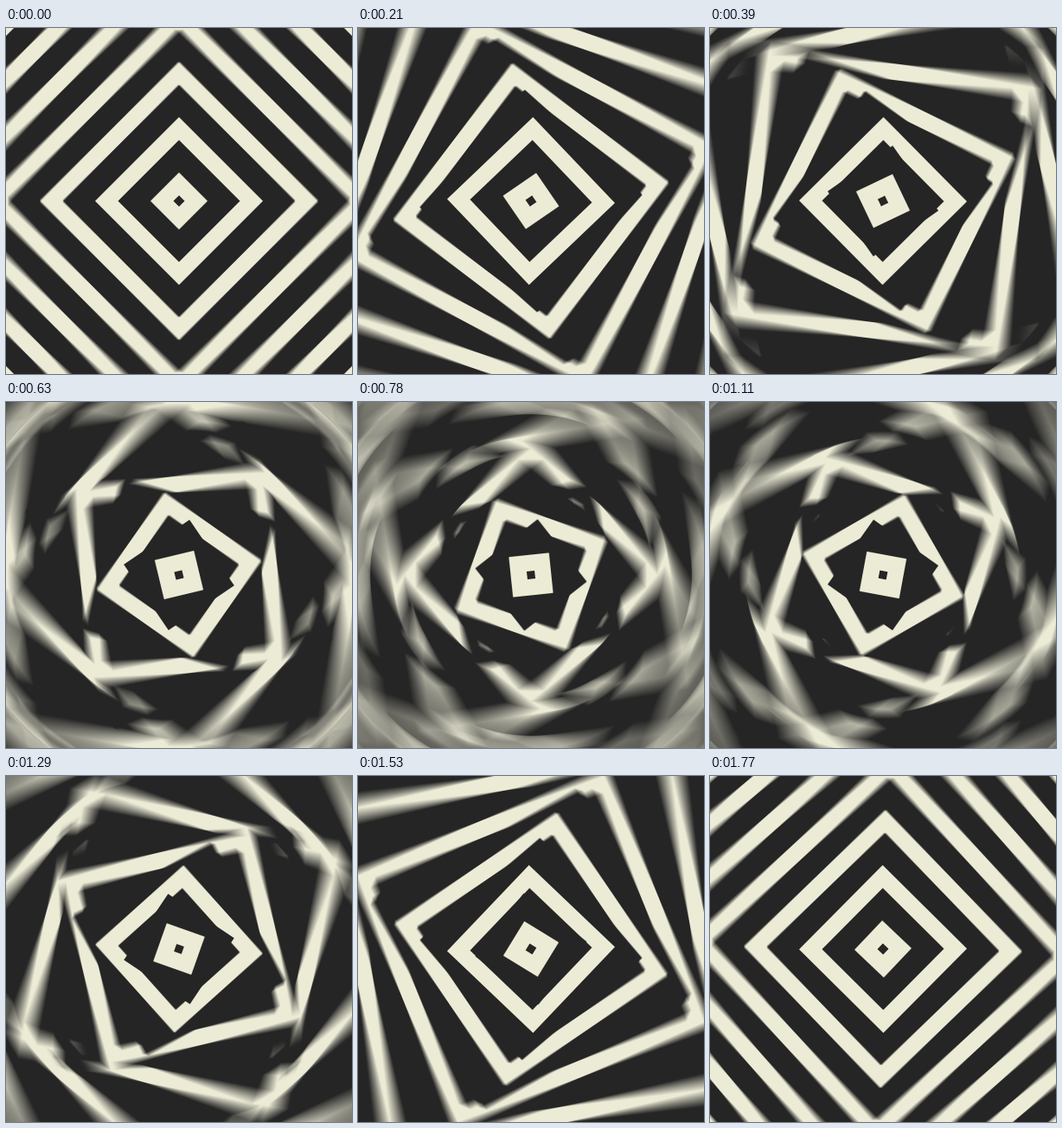
Recreate the animation shown at these times as an HTML page with a canvas. Size 400x400 px, loop 1800 ms.

```html
<!DOCTYPE html>
<html lang="en">
<head>
<meta charset="utf-8">
<title>Twisting squares</title>
<style>
html, body { margin: 0; width: 100%; height: 100%; overflow: hidden; background: #252525; }
canvas { display: block; width: 400px; height: 400px; }
</style>
</head>
<body>
<canvas id="stage" width="400" height="400"></canvas>
<script>
const HALF = 200, LOOP = 1800, FRAMES = 60;
const SAMPLES = 48, SHUTTER = 1.4;
const LAYERS = 14, STEP = 32, OUTER = 33, INNER = 6.5;
const DARK = [37, 37, 37], CREAM = [236, 235, 214];

const view = document.getElementById('stage').getContext('2d');
view.imageSmoothingEnabled = false;

function quarterCanvas() {
  const canvas = document.createElement('canvas');
  canvas.width = canvas.height = HALF;
  return canvas.getContext('2d', { willReadFrequently: true });
}

// The picture repeats every quarter turn, so only one quadrant is computed.
const pen = quarterCanvas(), quarter = quarterCanvas();
const picture = quarter.createImageData(HALF, HALF);
const sum = new Float32Array(HALF * HALF);
pen.lineWidth = (OUTER - INNER) / Math.SQRT2;

// A steady drift blended with a steep ease through the middle of the loop.
function twist(t) {
  const rise = p => 0.21 * 2 * p + 0.29 * Math.pow(2 * p, 3.5);
  return t < 0.5 ? rise(t) : 1 - rise(1 - t);
}

function frameSquare(radius, angle, color) {
  const x = radius * Math.cos(angle), y = radius * Math.sin(angle);
  pen.strokeStyle = color;
  pen.beginPath();
  pen.moveTo(HALF + x, HALF + y);
  pen.lineTo(HALF - y, HALF + x);
  pen.lineTo(HALF - x, HALF - y);
  pen.lineTo(HALF + y, HALF - x);
  pen.closePath();
  pen.stroke();
}

// White marks cream, black marks dark; larger squares turn further.
function drawMask(time) {
  const t = time - Math.floor(time), e = twist(t);
  pen.fillStyle = '#000';
  pen.fillRect(0, 0, HALF, HALF);
  for (let i = LAYERS; i >= 0; i--) {
    const angle = (t - i * e) * Math.PI / 2;
    frameSquare(STEP * i + (OUTER + INNER) / 2, angle, i % 2 ? '#000' : '#fff');
  }
}

function render(frame) {
  sum.fill(0);
  for (let s = 0; s < SAMPLES; s++) {
    const shift = SHUTTER * ((s + 0.5) / SAMPLES - 0.5);
    drawMask((frame + shift) / FRAMES);
    const mask = pen.getImageData(0, 0, HALF, HALF).data;
    for (let i = 0; i < sum.length; i++) sum[i] += mask[i * 4];
  }
  const out = picture.data;
  for (let i = 0; i < sum.length; i++) {
    const k = sum[i] / (255 * SAMPLES);
    for (let c = 0; c < 3; c++) {
      out[i * 4 + c] = DARK[c] + (CREAM[c] - DARK[c]) * k;
    }
    out[i * 4 + 3] = 255;
  }
  quarter.putImageData(picture, 0, 0);
  const turns = [[1, 0], [0, 1], [-1, 0], [0, -1]];
  for (const [c, s] of turns) {
    view.setTransform(c, s, -s, c, HALF, HALF);
    view.drawImage(quarter.canvas, -HALF, -HALF);
  }
}

const start = performance.now();
let shown = -1;
function tick() {
  const time = Math.max(0, performance.now() - start) % LOOP;
  const frame = Math.floor(time / LOOP * FRAMES);
  if (frame !== shown) render(shown = frame);
  requestAnimationFrame(tick);
}
tick();
</script>
</body>
</html>
```
